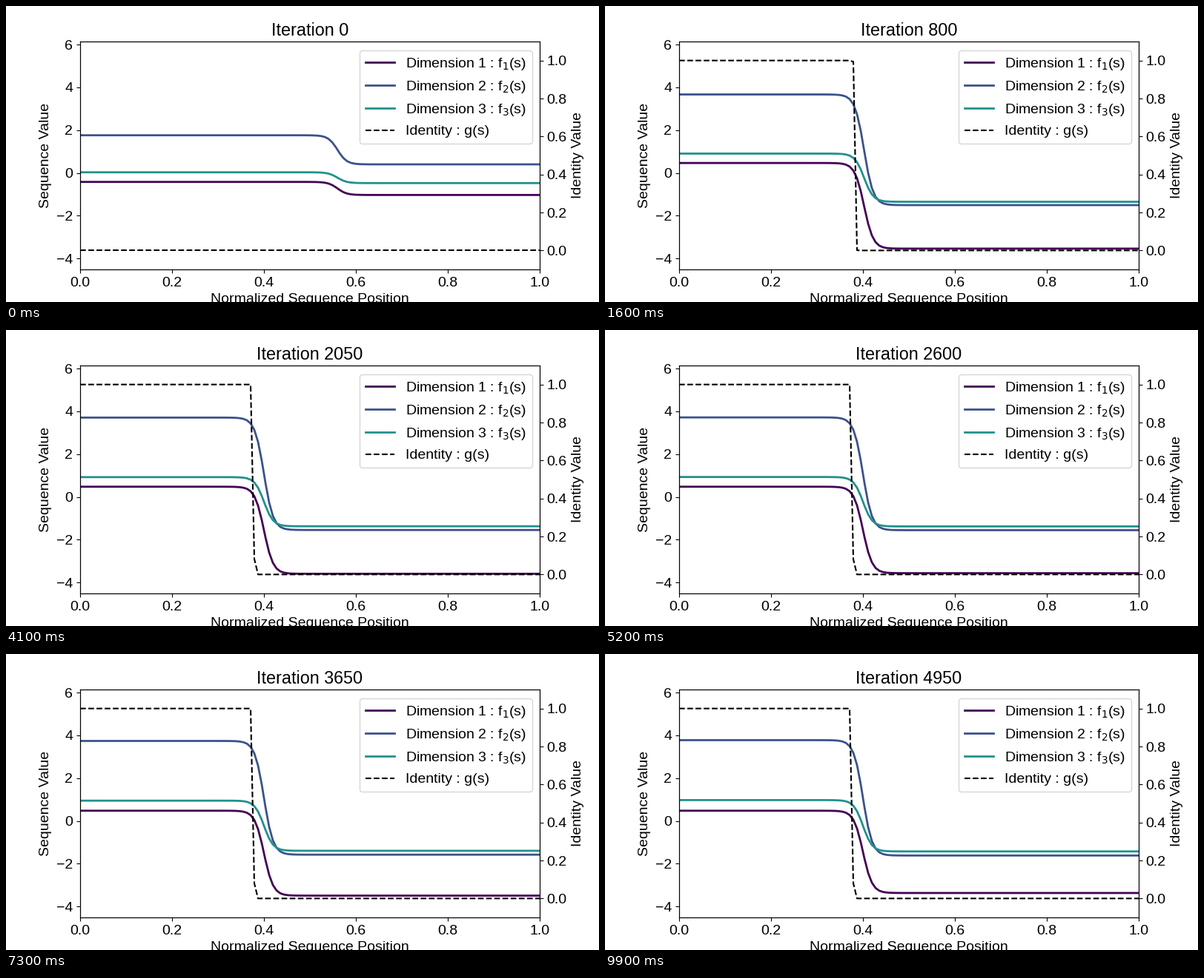
These frames come from a looping animation (800 by 400 pixels, 10000 ms). A matplotlib script:

```python
import numpy as np
import matplotlib.pyplot as plt
from matplotlib.animation import FuncAnimation

plt.rcParams.update({"font.family": "Liberation Sans", "font.size": 14})

FRAMES, INTERVAL, STEP = 100, 100, 50
STEEPNESS = 100    # of the value curves
SHARPNESS = 1500   # of the identity step

s = np.linspace(0, 1, 125)


def sigmoid(x):
    return 1 / (1 + np.exp(-np.clip(x, -60, 60)))


def settle(n, start, end, drift=0, tau=190):
    """Exponential approach to a level that drifts with the square of time."""
    late = end + drift * (n / 5000) ** 2
    return late + (start - late) * np.exp(-n / tau)


def levels(n):
    """Left and right plateau of each dimension."""
    return [
        (settle(n, -0.42, 0.477), settle(n, -1.03, -3.637, 0.275, tau=240)),
        (settle(n, 1.76, 3.693, 0.083), settle(n, 0.40, -1.53, -0.088)),
        (settle(n, 0.03, 0.915, 0.06), settle(n, -0.475, -1.36, -0.066)),
    ]


fig, ax = plt.subplots(figsize=(8, 4), dpi=100)
twin = ax.twinx()

colors = plt.cm.viridis([0, 0.25, 0.5])
curves = [
    ax.plot(s, s, color=c, lw=2, label=f"Dimension {i} : f$_{i}$(s)")[0]
    for i, c in enumerate(colors, 1)
]
identity, = twin.plot(s, s, "k--", lw=1.5, label="Identity : g(s)")

ax.set_xlim(0, 1)
ax.set_ylim(-4.51, 6.14)
twin.set_ylim(-0.1, 1.1)
ax.set_xlabel("Normalized Sequence Position")
ax.set_ylabel("Sequence Value")
twin.set_ylabel("Identity Value")
title = ax.set_title("Iteration 0")
ax.legend(handles=curves + [identity], loc="upper right",
          bbox_to_anchor=(1, 0.9935), labelspacing=0.52)


def update(frame):
    n = frame * STEP
    plateaus = levels(n)
    step = sigmoid(STEEPNESS * (s - settle(n, 0.56, 0.4)))
    for curve, (left, right) in zip(curves, plateaus):
        curve.set_ydata(left + (right - left) * step)
    # identity switches on once the first dimension turns positive
    on = sigmoid(40 * (plateaus[0][0] - 0.05))
    edge = settle(n, 0.54, 0.3774, tau=230)
    identity.set_ydata(on * sigmoid(SHARPNESS * (edge - s)))
    title.set_text(f"Iteration {n}")
    return [*curves, identity, title]


anim = FuncAnimation(fig, update, frames=FRAMES, interval=INTERVAL,
                     repeat=True, repeat_delay=0)
plt.show()
```
